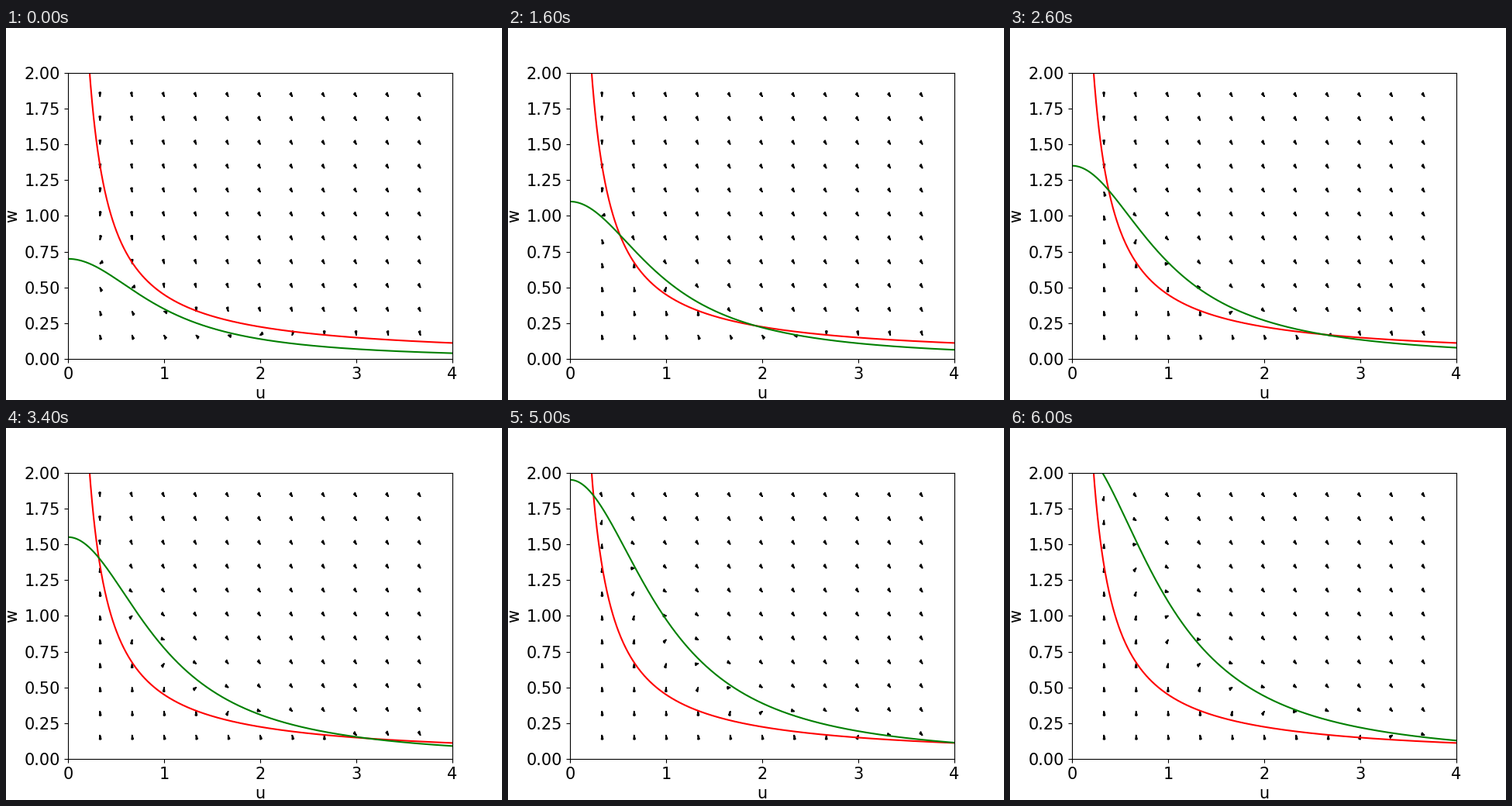
Recreate the animation shown at these times as a matplotlib script. Size 640 by 480 pixels, loop 6.2 s.

```python
import numpy as np
import matplotlib.pyplot as plt
from matplotlib.animation import FuncAnimation

FRAMES, INTERVAL = 31, 200
LOSS = 0.45
RAIN_START, RAIN_STEP = 0.7, 0.05

plt.rcParams.update({"font.family": "DejaVu Sans", "font.size": 15})
fig, ax = plt.subplots(figsize=(6.4, 4.8), dpi=100)
ax.set(xlim=(0, 4), ylim=(0, 2), xlabel="u", ylabel="w")

u = np.linspace(0, 4, 801)
ax.plot(u[1:], LOSS / u[1:], color="red")
water, = ax.plot([], [], color="green")

grid = [(x, y) for x in np.linspace(0, 4, 13)[1:-1]
        for y in np.linspace(0, 2, 13)[1:-1]]


def flow(x, y, rain):
    """Short step along the field at (x, y)."""
    du = y * x**2 - LOSS * x
    dw = rain - y - y * x**2
    size = np.hypot(du, dw) * 1000
    return du / size, dw / size


# Heads keep their shape in data units, with the tip on the grid point.
heads = [ax.arrow(x, y, *flow(x, y, RAIN_START), width=0.001,
                  head_width=0.02, head_length=0.03,
                  length_includes_head=True, color="black")
         for x, y in grid]


def update(i):
    rain = RAIN_START + RAIN_STEP * i
    water.set_data(u, rain / (1 + u**2))
    for head, (x, y) in zip(heads, grid):
        dx, dy = flow(x, y, rain)
        head.set_data(x=x, y=y, dx=dx, dy=dy)
    return [water, *heads]


anim = FuncAnimation(fig, update, frames=FRAMES, interval=INTERVAL,
                     init_func=lambda: update(0), repeat=True, repeat_delay=0)
plt.show()
```
